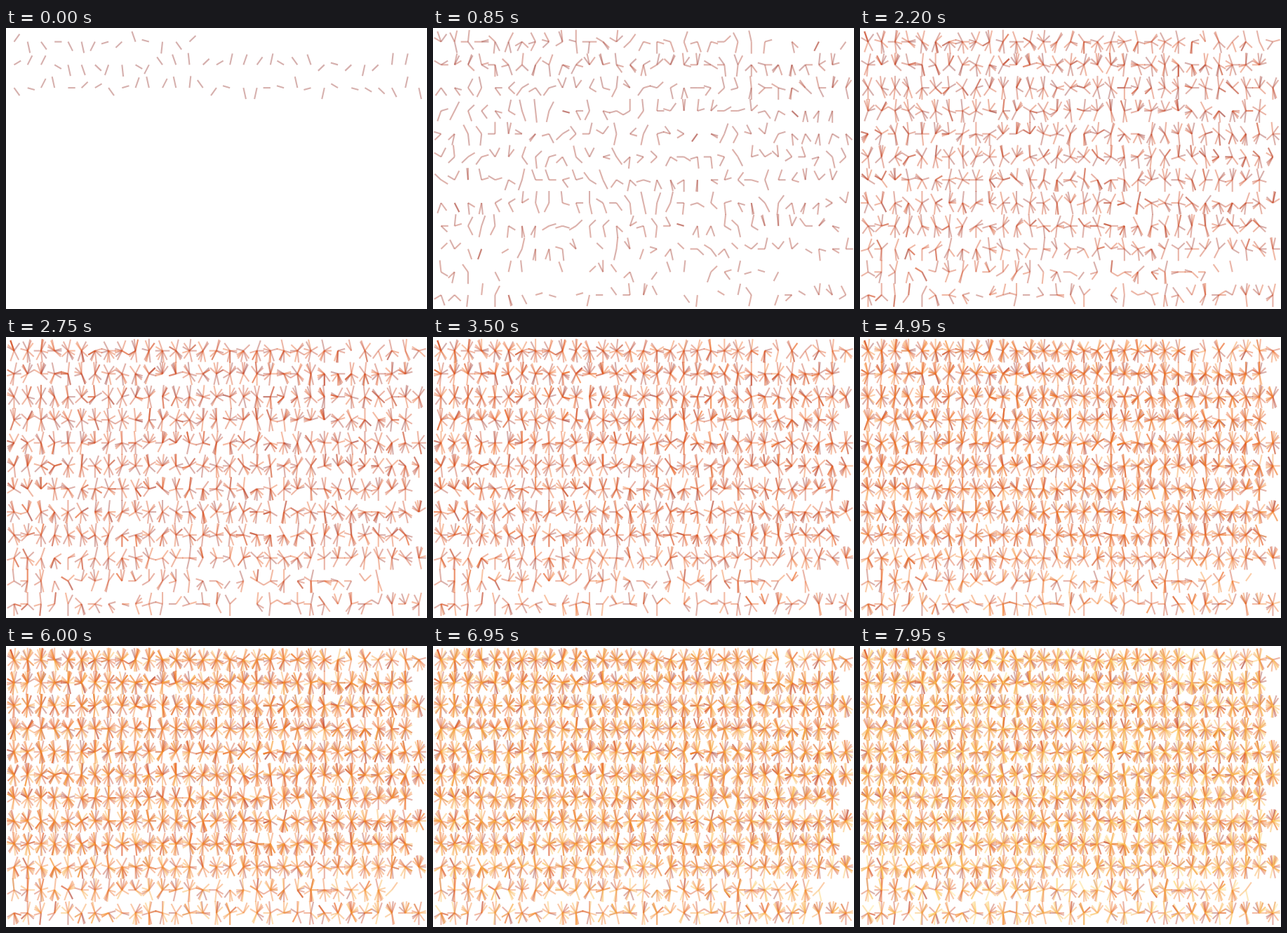
An HTML page with a canvas for the animation above (8000 ms loop, 600x400 px).

```html
<!DOCTYPE html>
<html lang="en">
<head>
<meta charset="utf-8">
<title>Daily directions</title>
<style>
  html, body { margin: 0; width: 100%; height: 100%; overflow: hidden; background: #fff; }
  canvas { display: block; width: 600px; height: 400px; }
</style>
</head>
<body>
<canvas id="stage" width="600" height="400"></canvas>
<script>
const ctx = document.getElementById('stage').getContext('2d');
const LOOP = 8000;
const STEPS = 62;
const FIRST_MARKS = 75;
const MARKS_PER_STEP = 127;
const DAY_MS = 864e5;

// Mark colours from the newest date to the oldest.
const ramp = [
  [150, 56, 50], [204, 70, 36], [234, 92, 28], [243, 124, 38],
  [247, 156, 50], [250, 192, 78], [254, 224, 122]
];

function seeded(seed) {
  return () => {
    seed = (seed + 0x6D2B79F5) | 0;
    let x = Math.imul(seed ^ (seed >>> 15), 1 | seed);
    x = (x + Math.imul(x ^ (x >>> 7), 61 | x)) ^ x;
    return ((x ^ (x >>> 14)) >>> 0) / 4294967296;
  };
}

function colorAt(p) {
  const pos = p * (ramp.length - 1);
  const i = Math.min(Math.floor(pos), ramp.length - 2);
  const rgb = ramp[i].map((c, j) => Math.round(c + (ramp[i + 1][j] - c) * (pos - i)));
  return `rgba(${rgb}, 0.4)`;
}

// Even steps at first, then pairs of a long and a short one.
function tickTime(step) {
  if (step < 10) return step * 150;
  const slot = step + 2;
  return slot * 125 + (slot % 2 ? 75 : 0);
}

const ticks = Array.from({ length: STEPS }, (_, step) => tickTime(step));
const marksShown = step => FIRST_MARKS + step * MARKS_PER_STEP;

// Winter has missing days.
function gapChance(month, day) {
  if (month < 2) return 0.5;
  if (month === 2) return 0.25;
  return month === 11 && day > 24 ? 0.4 : 0;
}

// One mark per recorded day, running backwards from the newest date.
function makeMarks() {
  const random = seeded(41);
  const total = marksShown(STEPS - 1);
  const list = [];
  let time = Date.UTC(2024, 11, 14);
  let heading = 0;
  for (; list.length < total; time -= DAY_MS) {
    const date = new Date(time);
    const month = date.getUTCMonth();
    const day = date.getUTCDate();
    heading += (random() + random() - 1) * 170;
    if (random() < gapChance(month, day)) continue;
    const angle = Math.round(heading / 10) * Math.PI / 18;
    const x = 11.5 + (day - 1) * 19.23;
    const y = 19.6 + (11 - month) * 32.77;
    list.push({
      x, y,
      tipX: x + 10.3 * Math.sin(angle),
      tipY: y - 17 * Math.cos(angle),
      color: colorAt(list.length / total)
    });
  }
  return list;
}

const marks = makeMarks();
let drawn = 0;

function show(count) {
  if (count < drawn) drawn = 0;
  if (!drawn) ctx.clearRect(0, 0, 600, 400);
  ctx.lineWidth = 2.1;
  for (; drawn < count; drawn++) {
    const m = marks[drawn];
    ctx.strokeStyle = m.color;
    ctx.beginPath();
    ctx.moveTo(m.x, m.y);
    ctx.lineTo(m.tipX, m.tipY);
    ctx.stroke();
  }
}

const start = performance.now();
function frame() {
  const t = (performance.now() - start) % LOOP;
  const step = ticks.filter(tick => tick <= t).length - 1;
  show(marksShown(step));
  requestAnimationFrame(frame);
}
frame();
</script>
</body>
</html>
```
